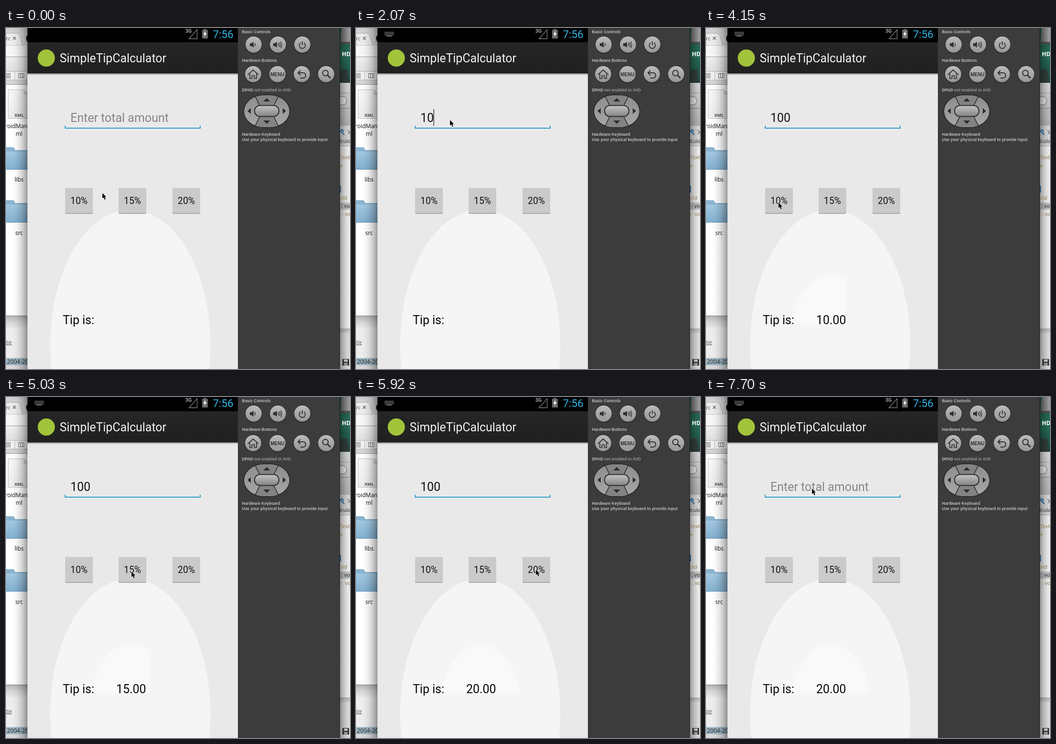
These frames come from a looping animation (721 px wide and 715 px high, 8000 ms). An HTML page with a canvas:

```html
<!DOCTYPE html>
<html lang="en">
<head>
<meta charset="utf-8">
<title>Tip calculator demo</title>
<style>
html, body { margin: 0; width: 100%; height: 100%; overflow: hidden; background: #fff; }
canvas, #layer { position: absolute; left: 0; top: 0; width: 721px; height: 715px; display: block; }
text { font-family: Roboto, sans-serif; white-space: pre; }
.mac { font-family: "Open Sans", sans-serif; }
.emu { font-family: "Liberation Sans", Arial, sans-serif; font-weight: bold; }
</style>
</head>
<body>
<canvas id="scene" width="721" height="715"></canvas>
<svg id="layer" width="721" height="715" viewBox="0 0 721 715"></svg>
<script>
const ctx = document.getElementById('scene').getContext('2d');
const layer = document.getElementById('layer');
const LOOP = 8000;
const BUTTON_X = [124, 236, 349];
const LABELS = ['10%', '15%', '20%'];

// ---------- canvas helpers ----------
function rect(x, y, w, h, fill) {
  ctx.fillStyle = fill;
  ctx.fillRect(x, y, w, h);
}
function ramp(x0, y0, x1, y1, ...colors) {
  const g = ctx.createLinearGradient(x0, y0, x1, y1);
  colors.forEach((c, i) => g.addColorStop(i / (colors.length - 1), c));
  return g;
}
function round(x, y, w, h, r, fill, stroke) {
  ctx.beginPath();
  ctx.roundRect(x, y, w, h, r);
  paint(fill, stroke);
}
function oval(x, y, rx, ry, fill, stroke) {
  ctx.beginPath();
  ctx.ellipse(x, y, rx, ry, 0, 0, Math.PI * 2);
  paint(fill, stroke);
}
function path(d, fill, stroke, width = 1, x = 0, y = 0) {
  ctx.save();
  ctx.translate(x, y);
  ctx.lineWidth = width;
  const p = new Path2D(d);
  if (fill) { ctx.fillStyle = fill; ctx.fill(p); }
  if (stroke) { ctx.strokeStyle = stroke; ctx.stroke(p); }
  ctx.restore();
}
function paint(fill, stroke) {
  if (fill) { ctx.fillStyle = fill; ctx.fill(); }
  if (stroke) { ctx.strokeStyle = stroke; ctx.lineWidth = 1; ctx.stroke(); }
}
// window shadow, strongest at x0
function shade(x0, x1) {
  const alphas = [.4, .22, .1, .03, 0];
  rect(Math.min(x0, x1), 0, Math.abs(x1 - x0), 715,
    ramp(x0, 0, x1, 0, ...alphas.map(a => `rgba(0,0,0,${a})`)));
}

// ---------- desktop behind the phone ----------
function drawFolder(y) {
  path(`M0 ${y} H14 Q18 ${y} 19 ${y + 6} H45 V${y + 47} H0 Z`, '#8ab4d1');
  rect(0, y + 9, 45, 37, ramp(0, y + 9, 0, y + 46, '#a3c8e1', '#82b0d0'));
  rect(0, y + 46, 45, 1, '#6792b3');
}

function drawLeft() {
  rect(0, 0, 45, 715, '#fff');
  rect(0, 0, 45, 38, ramp(0, 0, 0, 38, '#cfcfcf', '#e2e2e2'));
  path('M0 11 H24 Q29 12 31 22 L36 37 H0 Z', '#ececec', '#a5a5a5');
  path('M14.5 18.5 l6 6 m0 -6 l-6 6', null, '#666', 1.5);
  oval(50, 22, 8, 9, '#151515');
  rect(0, 37, 45, 24, '#f6f6f6');
  rect(0, 60, 45, 1, '#999');
  rect(0, 61, 45, 58, ramp(0, 61, 0, 119, '#eee', '#d2d2d2'));
  round(-6, 91, 60, 18, 3, '#f1f1f1', '#aaa');
  for (let i = 0; i < 4; i++) rect(0, 95 + i * 3, 10, 1, '#555');
  ctx.strokeStyle = '#666';
  ctx.strokeRect(26.5, 95.5, 11, 9);
  path('M30.5 95 V105 M34.5 95 V105', null, '#666');
  rect(18, 92, 1, 16, '#bbb');
  rect(0, 118, 45, 1, '#999');
  path('M4.5 129.5 H38 L48 139 V189.5 H4.5 Z', ramp(4, 129, 40, 189, '#f7f7f7', '#e9e9e9'), '#bbb');
  path('M36 129 L37 140 H46 Z', '#d5d5d5');
  drawFolder(250);
  drawFolder(361);
  rect(0, 603, 45, 1, '#888');
  rect(0, 604, 45, 28, ramp(0, 604, 0, 632, '#b5b5b5', '#d8d8d8', '#ededed'));
  rect(0, 632, 45, 60, '#ededed');
  rect(0, 692, 45, 15, '#9fb7c5');
  rect(0, 707, 45, 8, '#d9d9d9');
  shade(45, 12);
}

function drawRight() {
  rect(700, 0, 21, 715, '#fff');
  rect(700, 0, 21, 115, ramp(0, 0, 0, 115, '#1f5a4b', '#2b7760', '#1c4c40'));
  path('M703 0 H721 V34 H701 Z', ramp(702, 0, 721, 0, '#777', '#aaa'));
  rect(701, 29, 20, 5, '#565656');
  path('M702 87 H715 L719 114 H700 Z', '#35413e');
  rect(700, 115, 21, 90, ramp(0, 115, 0, 205, '#e6e6e6', '#bdbdbd'));
  rect(700, 136, 21, 1, '#aaa');
  round(690, 144, 24, 17, 8, '#f4f4f4', '#777');
  rect(700, 168, 21, 1, '#888');
  rect(700, 205, 21, 42, '#e6e6e6');
  oval(704, 216, 3.5, 3.5, '#7cb5de', '#286fa6');
  path('M705 220 l4 4', null, '#286fa6', 2);
  path('M716 214 l5 5 m-4 3 l4 -3', null, '#555', 1.2);
  rect(700, 247, 21, 1, '#bbb');
  rect(700, 331, 2, 14, '#3b8bd0');
  rect(700, 366, 21, 15, '#d2d2d2');
  rect(700, 630, 21, 10, ramp(0, 630, 0, 640, '#c4c4c4', '#e2e2e2'));
  rect(700, 640, 21, 75, '#ececec');
  round(705, 694, 14, 14, 1, '#333');
  rect(708, 695, 8, 5, '#ddd');
  rect(708, 702, 8, 6, '#aaa');
  shade(700, 733);
}

// ---------- phone ----------
function drawPhone() {
  rect(45, 0, 441, 715, '#e9e9e9');
  ctx.save();
  ctx.beginPath();
  ctx.rect(45, 97, 441, 618);
  ctx.clip();
  oval(260.5, 665, 168, 284, '#f5f5f5');
  ctx.restore();

  rect(45, 0, 441, 30, '#000');
  rect(45, 30, 441, 65, ramp(0, 30, 0, 95, '#262626', '#202020'));
  rect(45, 95, 441, 5, ramp(0, 95, 0, 100, 'rgba(0,0,0,.55)', 'rgba(0,0,0,.12)', 'rgba(0,0,0,0)'));
  path('M383.5 22.5 H400.5 V3.5 Z', null, '#808080', 1.3);
  path('M414 2 H420 V4 H423 V22 H411 V4 H414 Z', '#696969');
  path('M418 6 L413.5 13.5 H416.5 L415.5 19 L420.5 11 H417.5 Z', '#fff');
  oval(84.5, 63, 18, 18, '#a1c43b');

  path('M124 205 V210 H407 V205', null, '#2f9dcd', 2);
  for (const x of BUTTON_X) {
    round(x, 335, 58, 54.5, 2, '#989898');
    round(x, 335, 58, 53, 2, '#cacaca');
    rect(x + 1, 335, 56, 1, '#d6d6d6');
  }
}

// ---------- emulator controls ----------
function knob(x, y) {
  oval(x, y + 1, 18, 18, '#2a2a2a');
  oval(x, y, 17, 17, ramp(0, y - 17, 0, y + 17, '#cfcfcf', '#a0a0a0', '#7e7e7e'));
  oval(x, y, 15.5, 15.5, ramp(0, y - 16, 0, y + 16, '#b8b8b8', '#989898'));
}

function drawControls() {
  rect(486, 0, 213, 715, '#3c3c3c');
  rect(699, 0, 1, 715, '#222');
  [519, 570, 621].forEach(x => knob(x, 35));
  [518, 569, 620, 671].forEach(x => knob(x, 97));
  const ink = '#303030';
  const speaker = 'M-7 -3 H-3.5 L1 -6 V6 L-3.5 3 H-7 Z';
  path(speaker, ink, null, 1, 518, 35);
  path('M3.5 -3 Q5.5 0 3.5 3', null, ink, 1.4, 518, 35);
  path(speaker, ink, null, 1, 567, 35);
  path('M3.5 -3 Q5.5 0 3.5 3 M6 -5 Q9.5 0 6 5 M8.8 -7 Q13 0 8.8 7', null, ink, 1.4, 567, 35);
  path('M-3.5 -5 A6.4 6.4 0 1 0 3.5 -5 M0 -8 V0', null, ink, 1.8, 621, 36);
  path('M-11 1 L0 -9 L11 1 M-7 -1 V9 H-2.5 V3 H2.5 V9 H7 V-1', null, ink, 1.7, 518, 97);
  path('M-3 -9 L-8 -4 L-3 1 M-8 -4 H3 Q8 -4 8 1.5 Q8 7 2 7 H-3', null, ink, 2, 620, 98);
  ctx.lineWidth = 2;
  ctx.strokeStyle = ink;
  ctx.beginPath();
  ctx.arc(669.5, 94.5, 5.8, 0, Math.PI * 2);
  ctx.stroke();
  path('M674 99 l6 6', null, ink, 2.8);

  // directional pad
  round(497.5, 139.5, 98, 70, { x: 43, y: 35 }, '#222');
  ctx.save();
  ctx.beginPath();
  ctx.roundRect(499, 141, 95, 67, { x: 42, y: 33.5 });
  ctx.clip();
  rect(499, 141, 95, 67, ramp(0, 141, 0, 208, '#8c8c8c', '#a8a8a8'));
  const lobe = 'M-27 -36 L-14 -10 H14 L27 -36 Z';
  path(lobe, '#838383', '#2a2a2a', 1.6, 546.5, 174);
  ctx.translate(546.5, 174.5);
  ctx.scale(1, -1);
  path(lobe, '#838383', '#2a2a2a', 1.6);
  ctx.restore();
  round(520, 161.5, 53, 25, 12, '#2e2e2e');
  round(522, 163.5, 49, 21, 10, ramp(0, 163, 0, 185, '#c2c2c2', '#858585'));
  path('M546.5 147 l7 7 h-14 Z M546.5 201 l7 -7 h-14 Z M506 174 l7 -6 v12 Z M587 174 l-7 -6 v12 Z', '#2b2b2b');
}

// ---------- vector layer ----------
function make(tag, attrs, parent = layer) {
  const node = document.createElementNS('http://www.w3.org/2000/svg', tag);
  for (const key in attrs) node.setAttribute(key, attrs[key]);
  parent.appendChild(node);
  return node;
}
function text(x, y, str, size, fill, attrs = {}, parent = layer) {
  const node = make('text', { x, y, 'font-size': size, fill, ...attrs }, parent);
  node.textContent = str;
  return node;
}
function show(node, on) {
  node.style.display = on ? '' : 'none';
}

function addDesktopText() {
  const left = make('svg', { x: 0, y: 0, width: 45, height: 715 });
  const mid = { class: 'mac', 'text-anchor': 'middle' };
  const mac = { class: 'mac' };
  text(0, 26, 'rc', 11, '#555', mac, left);
  text(27.5, 186, 'XML', 9, '#444', { ...mid, 'font-weight': 700 }, left);
  text(-2, 210, 'roidMan', 12, '#111', mac, left);
  text(27.5, 226, 'ml', 12, '#111', mid, left);
  text(27.5, 322, 'libs', 12, '#111', mid, left);
  text(27.5, 434, 'src', 12, '#111', mid, left);
  text(-3, 663, 'ttie', 11, '#555', { ...mac, 'font-style': 'italic', 'text-decoration': 'underline' }, left);
  text(2, 704, '2004-2012', 12, '#222', mac, left);

  const right = make('svg', { x: 700, y: 0, width: 21, height: 715 });
  text(4, 59, 'HD', 12, '#fff', { ...mac, 'font-weight': 700 }, right);
  text(-1, 241, 'lcula', 11, '#222', mac, right);
  text(0, 275, 'Text', 11, '#8b7140', mac, right);
  text(-3, 292, 'w', 11, '#8b7140', mac, right);
  text(-1, 360, 'oid', 11, '#8b7140', mac, right);
  text(3, 377, ': void', 11, '#222', mac, right);
  text(-2, 394, ') : void', 11, '#8b7140', mac, right);
}

function addControlText() {
  const emu = { class: 'emu' };
  text(494.5, 11, 'Basic Controls', 8.5, '#bdbdbd', emu);
  text(494.5, 71, 'Hardware Buttons', 8.5, '#bdbdbd', emu);
  text(494.5, 133, 'DPAD', 8.5, '#bdbdbd', emu);
  text(520, 133, 'not enabled in AVD', 8.5, '#969696', emu);
  text(494.5, 226, 'Hardware Keyboard', 8.5, '#bdbdbd', emu);
  text(494.5, 236.5, 'Use your physical keyboard to provide input', 8.5, '#bdbdbd', emu);
  text(569, 101, 'MENU', 10, '#303030', { ...emu, 'text-anchor': 'middle' });
}

drawLeft();
drawRight();
drawPhone();
drawControls();
addDesktopText();
addControlText();

const glowBox = make('svg', { x: 118, y: 328, width: 0, height: 293 });
make('ellipse', { cx: 143, cy: 337, rx: 87, ry: 147, fill: '#f9f9f9' }, glowBox);

const pressed = make('g', {});
make('rect', { x: -6, y: 329, width: 70, height: 66, rx: 5, fill: '#33b5e5', 'fill-opacity': .3 }, pressed);
make('rect', { x: 0, y: 335, width: 58, height: 54, rx: 2, fill: '#83c8e3' }, pressed);

const keys = make('g', { fill: '#8c8c8c' });
for (let row = 0; row < 3; row++)
  for (let col = 0; col < 7; col++)
    make('rect', { x: 60 + col * 2.8 + (row % 2) * .6, y: 8 + row * 2.8, width: 1.8, height: 1.8 }, keys);
make('rect', { x: 64, y: 16, width: 11, height: 1.6 }, keys);

text(376, 10, '3G', 10.5, '#a8a8a8', { 'font-weight': 700 });
text(433.5, 21, '7:56', 22.4, '#33b5e5');
text(112.5, 72, 'SimpleTipCalculator', 24.9, '#f3f3f3');
LABELS.forEach((s, i) => text(BUTTON_X[i] + 29, 369, s, 19.3, '#111', { 'text-anchor': 'middle' }));
text(119, 621, 'Tip is:', 24.9, '#080808');
const tipText = text(231, 621, '', 24.9, '#080808');
const fieldText = text(135, 197, '', 25, '#111');
const caret = make('rect', { y: 170, width: 1.6, height: 35, fill: '#444' });
const pointer = make('path', {
  d: 'M0 0 V11.6 L2.7 9.2 L4.9 14 L6.9 13.1 L4.8 8.4 H8.4 Z',
  fill: '#000', stroke: '#fff', 'stroke-width': 1.4, 'paint-order': 'stroke'
});

// ---------- timeline: each row holds from its time onward ----------
const pointerTrack = [
  [0, 202, 346], [150, 186, 318], [290, 140, 258], [440, 116, 215], [580, 150, 197], [730, 197, 193],
  [3260, 193, 192], [3400, 191, 197], [3550, 184, 235], [3700, 165, 310], [3850, 153, 362], [4000, 152, 366],
  [4290, 158, 366], [4440, 200, 365], [4590, 248, 365], [4740, 263, 366], [5180, 274, 366],
  [5320, 318, 364], [5470, 367, 362], [5620, 377, 362], [6060, 300, 270], [6210, 222, 192]
];
const entryTrack = [[0, ''], [2070, '10'], [2220, '100'], [7110, '1'], [7250, '']];
const tipTrack = [[0, '', 0], [4150, '10.00', 174], [5030, '15.00', 182], [5920, '20.00', 295]];
const pressTrack = [[0, -1], [4000, 0], [4150, -1], [4890, 1], [5030, -1], [5770, 2], [5920, -1]];
// the caret flips at each of these times
const caretFlips = [1030, 1470, 2070, 2810, 3260, 3700, 4290, 4740, 5180, 5770, 6210, 6810, 7110, 7700];

function at(track, t) {
  let row = track[0];
  for (const next of track) if (next[0] <= t) row = next;
  return row;
}

function render(now) {
  const t = now % LOOP;
  const [, x, y] = at(pointerTrack, t);
  pointer.setAttribute('transform', `translate(${x} ${y})`);

  const entry = at(entryTrack, t)[1];
  fieldText.textContent = entry || 'Enter total amount';
  fieldText.setAttribute('fill', entry ? '#111' : '#868686');
  caret.setAttribute('x', 135.2 + entry.length * 13.5);
  show(caret, caretFlips.filter(f => f <= t).length % 2);
  show(keys, t >= 1030);

  const [, tip, glowWidth] = at(tipTrack, t);
  tipText.textContent = tip;
  glowBox.setAttribute('width', glowWidth);
  show(glowBox, glowWidth);

  const active = at(pressTrack, t)[1];
  show(pressed, active >= 0);
  if (active >= 0) pressed.setAttribute('transform', `translate(${BUTTON_X[active]} 0)`);
}

const start = performance.now();
function tick() {
  render(performance.now() - start);
  requestAnimationFrame(tick);
}
tick();
</script>
</body>
</html>
```
